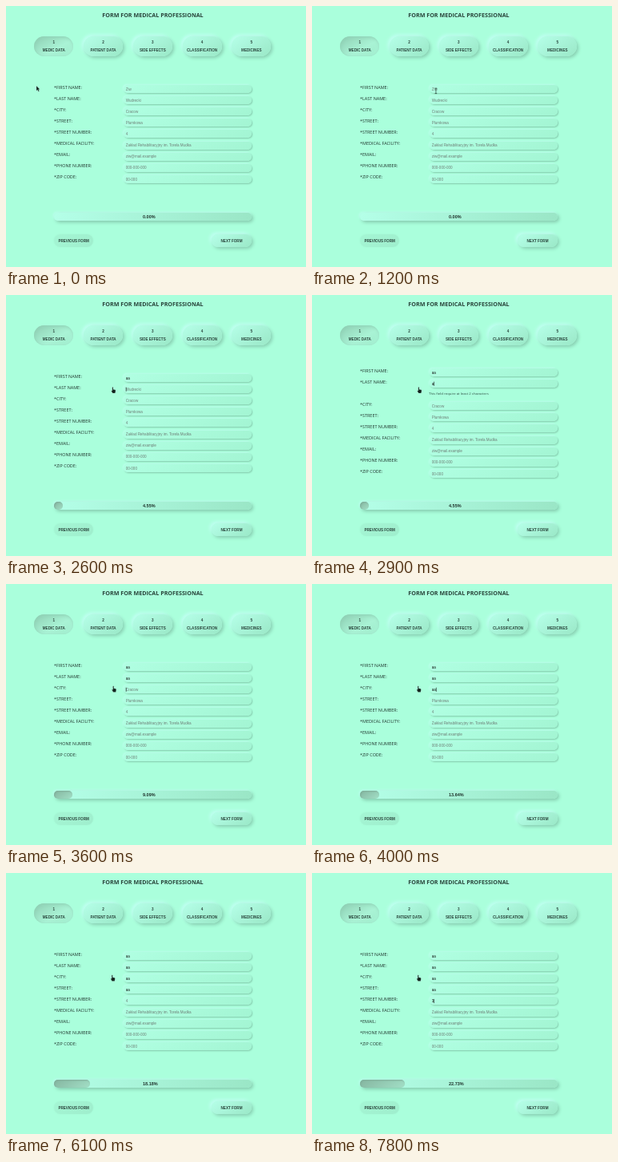
An HTML page for the animation above (8000 ms loop, 375 by 327 pixels).

```html
<!DOCTYPE html>
<html lang="en">
<head>
<meta charset="utf-8">
<title>Medical form</title>
<style>
  html, body { margin: 0; width: 100%; height: 100%; overflow: hidden; background: #aaffdc; }
  #stage { position: relative; width: 375px; height: 327px; overflow: hidden; background: #aaffdc; }
  .pill { position: absolute; border-radius: 99px; }
  .raised { background: linear-gradient(145deg, #b5ffe8, #9ae8c7);
    box-shadow: 2px 2px 4px #87cdb0, -2px -2px 4px #c4fff5; }
  .pressed { background: linear-gradient(150deg, #8fcfb4, #a9f3d5 60%, #9eeccb);
    box-shadow: inset 1px 1px 4px #8ccdb1, inset -1px -1px 4px #aef8dc; }
  .disabled { background: linear-gradient(145deg, #a4f6d4, #9feecd); box-shadow: 0 0 2px #a2f3d1; }
  .input { background: linear-gradient(145deg, #b0ffe2, #a3f5d3);
    box-shadow: 1px 1px 2px #83c9ab, -1px -1px 2px #bcffec; }
  .bar { background: linear-gradient(100deg, #b4ffe8, #9ae6c6);
    box-shadow: 2px 2px 4px #84c9ac, -1px -1px 3px #c0fff2; }
  .fill { background: linear-gradient(145deg, #85b5a0, #a2dfc6);
    box-shadow: inset 1px 1px 2px #7fae9a; }
  svg { position: absolute; inset: 0; }
  .title { font: 700 7.15px "Open Sans", sans-serif; fill: #29443b; }
  .label { font: 500 5.45px "Open Sans", sans-serif; fill: #1f332c; }
  .error { font: 400 4.3px "Open Sans", sans-serif; fill: #2f4f45; }
  .button { font: 700 4.58px "Liberation Sans", Arial, sans-serif; fill: #29443b; }
  .percent { font: 700 5.5px "Liberation Sans", Arial, sans-serif; fill: #1f332c; }
  .value { font: 400 4.58px "Liberation Sans", Arial, sans-serif; fill: #111; }
  .empty { fill: #6f7f78; }
  .mid { text-anchor: middle; }
</style>
</head>
<body>
<div id="stage"></div>
<script>
const LOOP = 8000;
const stage = document.getElementById('stage');

function pill(x, y, w, h, kind) {
  const el = document.createElement('div');
  el.className = 'pill ' + kind;
  el.style.cssText = `left:${x}px;top:${y}px;width:${w}px;height:${h}px`;
  return stage.appendChild(el);
}

const svg = document.createElementNS('http://www.w3.org/2000/svg', 'svg');
svg.setAttribute('width', 375);
svg.setAttribute('height', 327);

function draw(tag, attrs, content = '') {
  const el = document.createElementNS(svg.namespaceURI, tag);
  for (const key in attrs) el.setAttribute(key, attrs[key]);
  el.textContent = content;
  return svg.appendChild(el);
}
const text = (x, y, kind, content) => draw('text', { x, y, class: kind }, content);
const show = (el, on) => el.setAttribute('visibility', on ? 'visible' : 'hidden');

// Header, tabs and buttons
text(183.5, 13.6, 'title mid', 'FORM FOR MEDICAL PROFESSIONAL');
['MEDIC DATA', 'PATIENT DATA', 'SIDE EFFECTS', 'CLASSIFICATION', 'MEDICINES'].forEach((name, i) => {
  const cx = 59.8 + i * 61.75;
  pill(cx - 24.5, 38, 49, 24.5, i ? 'raised' : 'pressed');
  text(cx, 46.7, 'button mid', i + 1);
  text(cx, 56.7, 'button mid', name);
});
pill(60, 286, 49, 16, 'disabled');
text(84.6, 295.7, 'button mid', 'PREVIOUS FORM');
pill(257, 286, 50, 16, 'raised');
text(282, 295.7, 'button mid', 'NEXT FORM');

// Form rows; keys hold the times at which each character is typed
const fields = [
  { label: 'FIRST NAME', hint: 'Ziw', focus: 1350, char: 'a', keys: [1750, 1850] },
  { label: 'LAST NAME', hint: 'Wudrecki', focus: 2550, char: 'a', keys: [2850, 2950] },
  { label: 'CITY', hint: 'Cracow', focus: 3550, char: 'a', keys: [3850, 3950] },
  { label: 'STREET', hint: 'Plumkowa', focus: 4750, char: 'a', keys: [5350, 5450] },
  { label: 'STREET NUMBER', hint: '4', focus: 6650, char: '3', keys: [7250], caretHold: 800 },
  { label: 'MEDICAL FACILITY', hint: 'Zakład Rehabilitacyjny im. Torela Mudka' },
  { label: 'EMAIL', hint: 'ziw@mail.example' },
  { label: 'PHONE NUMBER', hint: '000-000-000' },
  { label: 'ZIP CODE', hint: '00-000' }
];
fields.forEach((field, i) => {
  field.y = 104 + i * 14.1;
  field.parts = [
    pill(147, Math.round(field.y - 5), 160, 10, 'input'),
    text(60, field.y - 0.5, 'label', `*${field.label}:`),
    field.value = text(149.7, field.y + 1.7, 'value', field.hint)
  ];
});

const error = text(146, 0, 'error', 'This field require at least 2 characters');
const caret = draw('rect', { width: 0.6, height: 5.2, fill: '#111' });
const squiggle = draw('path', {
  d: 'M150 149l1 .7 1-.7 1 .7 1-.7 1 .7', fill: 'none', stroke: '#d9604f', 'stroke-width': 0.5
});

// Progress
pill(60, 259, 247, 10, 'bar');
const fill = pill(60, 259, 0, 10, 'fill');
const percent = text(171, 265.9, 'percent', '');

// Mouse pointers
const outline = { fill: '#10211b', stroke: '#c9f5e4', 'stroke-width': 0.25 };
const pointers = {
  arrow: draw('path', { d: 'M0 0V6.3L1.5 5 2.5 7.2 3.6 6.7 2.6 4.6H4.4Z', ...outline }),
  beam: draw('path', { d: 'M-1.3-3.3H1.3M0-3.3V3.3M-1.3 3.3H1.3', stroke: '#10211b', 'stroke-width': 0.6 }),
  hand: draw('path', {
    d: 'M-.4.4Q.2-.4.8.4V3L3.3 3.5Q3.9 3.8 3.8 5L3.3 7.7H0L-1.6 5Q-1.5 4-.4 4.7Z', ...outline
  })
};
const path = [
  [450, 38, 100], [900, 100, 112], [1250, 158, 106], [1450, 157, 106], [1750, 129, 107.5],
  [2250, 129, 107.5], [2500, 133.2, 115.3], [3150, 133.2, 115.3], [3450, 134, 127.7],
  [3700, 134, 127.7], [3950, 132.5, 127.7]
];
stage.appendChild(svg);

const clamp = v => Math.min(1, Math.max(0, v));
const smooth = v => v * v * (3 - 2 * v);

// CSS "ease": cubic-bezier(.25, .1, .25, 1)
function ease(x) {
  const bezier = (a, b, s) => 3 * a * s * (1 - s) ** 2 + 3 * b * s * s * (1 - s) + s ** 3;
  let low = 0, high = 1;
  for (let i = 0; i < 20; i++) {
    const mid = (low + high) / 2;
    if (bezier(0.25, 0.25, mid) < x) low = mid; else high = mid;
  }
  return bezier(0.1, 1, low);
}

function pointerAt(t) {
  if (t <= path[0][0]) return path[0].slice(1);
  const next = path.findIndex(p => p[0] > t);
  if (next < 0) return path[path.length - 1].slice(1);
  const [t0, x0, y0] = path[next - 1], [t1, x1, y1] = path[next];
  const k = smooth((t - t0) / (t1 - t0));
  return [x0 + (x1 - x0) * k, y0 + (y1 - y0) * k];
}

function renderForm(t) {
  const invalid = fields.findIndex(f => f.keys && f.keys[1] && t >= f.keys[0] && t < f.keys[1]);
  const shift = i => invalid < 0 ? 0 : i <= invalid ? -7 : 7;
  let active = -1;
  fields.forEach((field, i) => {
    const typed = (field.keys || []).filter(k => t >= k).length;
    field.value.textContent = typed ? field.char.repeat(typed) : field.hint;
    field.value.classList.toggle('empty', !typed);
    field.parts.forEach(el => el.style.transform = `translateY(${shift(i)}px)`);
    if (t >= field.focus) active = i;
  });

  show(error, invalid >= 0);
  if (invalid >= 0) error.setAttribute('y', fields[invalid].y + 6.9);

  const field = fields[active];
  show(caret, false);
  if (field) {
    const past = field.keys.filter(k => t >= k);
    const age = t - (past.length ? past[past.length - 1] : field.focus);
    caret.setAttribute('x', 149.8 + past.length * 2.55);
    caret.setAttribute('y', field.y - 2.5 + shift(active));
    show(caret, age < (past.length && field.caretHold || 600));
  }
  show(squiggle, t >= 6450 && t < 6650);
}

function renderProgress(t) {
  const done = fields.filter(f => f.keys).map(f => f.keys[f.keys.length - 1]).filter(k => t >= k);
  const share = done.reduce((sum, start) => sum + ease(clamp((t - start) / 500)), 0) / 22;
  percent.textContent = (done.length / 22 * 100).toFixed(2) + '%';
  fill.style.width = share * 247.5 + 'px';
}

function renderPointer(t) {
  const [x, y] = pointerAt(t);
  const kind = t > 1180 && t < 1520 ? 'beam' : t > 2400 ? 'hand' : 'arrow';
  for (const name in pointers) {
    show(pointers[name], name === kind);
    pointers[name].setAttribute('transform', `translate(${x} ${y})`);
  }
}

function render(t) {
  renderForm(t);
  renderProgress(t);
  renderPointer(t);
}

const start = performance.now();
function tick() {
  render((performance.now() - start) % LOOP);
  requestAnimationFrame(tick);
}
tick();
</script>
</body>
</html>
```
